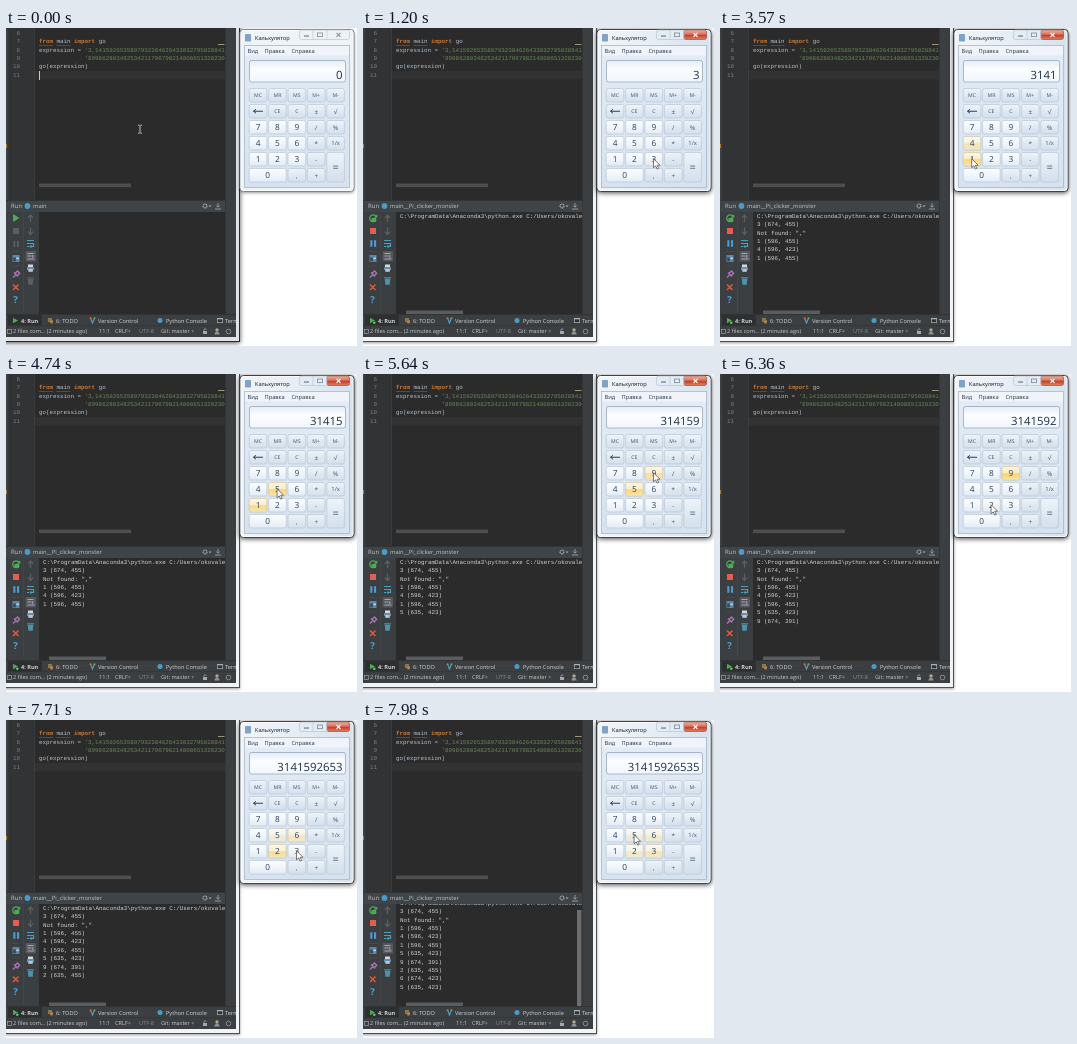
Write an HTML page that moves like this. It is 351x318 px and loops after 8 s.

```html
<!DOCTYPE html>
<html lang="en">
<head>
<meta charset="utf-8">
<title>Pi clicker</title>
<style>
html, body { margin: 0; width: 100%; height: 100%; overflow: hidden; background: #fff; }
svg { display: block; width: 351px; height: 318px; }
text { white-space: pre; text-rendering: geometricPrecision; }
.mono { font-family: "Liberation Mono", "DejaVu Sans Mono", monospace; font-size: 5.85px; }
.ui { font-family: "Open Sans", "Noto Sans", sans-serif; }
.shade { filter: drop-shadow(0 1px 2.5px rgba(0, 0, 0, .7)); }
.soft { filter: drop-shadow(0 1px 1.5px rgba(0, 0, 0, .4)); }
</style>
</head>
<body>
<svg id="stage" viewBox="0 0 351 318">
  <defs>
    <linearGradient id="key" x2="0" y2="1">
      <stop offset="0" stop-color="#fbfdff"/><stop offset=".5" stop-color="#f1f6fb"/><stop offset="1" stop-color="#e1eaf4"/>
    </linearGradient>
    <linearGradient id="func" x2="0" y2="1">
      <stop offset="0" stop-color="#edf3f9"/><stop offset="1" stop-color="#d3dfec"/>
    </linearGradient>
    <linearGradient id="hot" x2="0" y2="1">
      <stop offset="0" stop-color="#fdf6e3"/><stop offset=".46" stop-color="#fdebbd"/>
      <stop offset=".54" stop-color="#fad270"/><stop offset="1" stop-color="#fbe7a2"/>
    </linearGradient>
    <linearGradient id="screen" x2="0" y2="1">
      <stop offset="0" stop-color="#e4ecf6"/><stop offset=".4" stop-color="#fbfdff"/><stop offset="1" stop-color="#f1f6fc"/>
    </linearGradient>
    <linearGradient id="body" x2="0" y2="1">
      <stop offset="0" stop-color="#e3ecf6"/><stop offset="1" stop-color="#d6e2ef"/>
    </linearGradient>
    <linearGradient id="glass" x2="1" y2="0">
      <stop offset="0" stop-color="#f1f5f9"/><stop offset=".5" stop-color="#e6edf5"/><stop offset="1" stop-color="#d6e2ee"/>
    </linearGradient>
    <linearGradient id="red" x2="0" y2="1">
      <stop offset="0" stop-color="#e9b5a8"/><stop offset=".45" stop-color="#d8715e"/>
      <stop offset=".55" stop-color="#c5402a"/><stop offset="1" stop-color="#dd8260"/>
    </linearGradient>
    <clipPath id="editClip"><rect x="0" y="0" width="219" height="172"/></clipPath>
    <clipPath id="logClip"><rect x="33" y="184" width="186" height="102"/></clipPath>
    <clipPath id="ideClip"><rect x="0" y="0" width="230" height="309"/></clipPath>
  </defs>
</svg>
<script>
const LOOP = 8000, START = 90, FOCUS = 1110, SCROLL = 7890;
const stage = document.getElementById('stage');

function el(parent, tag, attrs, content) {
  const node = document.createElementNS('http://www.w3.org/2000/svg', tag);
  for (const k in attrs) node.setAttribute(k, attrs[k]);
  if (content !== undefined) node.textContent = content;
  parent.appendChild(node);
  return node;
}
const group = (p, attrs) => el(p, 'g', attrs || {});
const box = (p, x, y, width, height, fill, more) => el(p, 'rect', { x, y, width, height, fill, ...more });
const path = (p, d, stroke, more) => el(p, 'path', { d, stroke, fill: 'none', ...more });
const shape = (p, d, fill) => el(p, 'path', { d, fill });
const dot = (p, cx, cy, r, fill) => el(p, 'circle', { cx, cy, r, fill });
const mono = (p, x, y, s, fill, more) => el(p, 'text', { x, y, fill, class: 'mono', ...more }, s);
const label = (p, x, y, s, size, fill, more) =>
  el(p, 'text', { x, y, fill, class: 'ui', 'font-size': size, ...more }, s);
const show = (node, on) => node.setAttribute('visibility', on ? 'visible' : 'hidden');

// ---- IDE window ----
const frameOn = group(stage), frameOff = group(stage);
box(frameOn, -10, -10, 243.5, 323.5, '#dfe3e8', { stroke: '#26292c', class: 'shade' });
box(frameOff, -10, -10, 243.5, 323.5, '#f1f3f5', { stroke: '#4b4f52', class: 'soft' });

const ide = group(stage, { 'clip-path': 'url(#ideClip)' });
box(ide, 0, 0, 230, 309, '#3c3f41');
box(ide, 3, 0, 216, 172, '#2b2b2b');
box(ide, 3, 0, 25, 172, '#313335');
box(ide, 28, 43, 191, 8.5, '#323232');
box(ide, 28.5, 0, .5, 172, '#484b4d');
box(ide, 2.5, 0, .6, 286, '#2c2e2f');
box(ide, 219, 0, .6, 286, '#2c2e2f');
box(ide, 0, 116, 1, 4, '#b5722f');

const code = group(ide, { 'clip-path': 'url(#editClip)' });
const lineY = i => 7 + i * 8.3;
for (let i = 0; i < 6; i++)
  mono(code, 14, lineY(i), 6 + i, '#7d8285', { 'text-anchor': 'end' });
function codeLine(i, parts) {
  const t = mono(code, 33, lineY(i), '', '#a9b7c6');
  for (const [s, fill, weight] of parts) el(t, 'tspan', { fill, 'font-weight': weight || 400 }, s);
}
const plain = '#b4c1cf', word = '#cc7832', str = '#6a8759';
codeLine(1, [['from', word, 700], [' main ', plain], ['import', word, 700], [' go', plain]]);
codeLine(2, [['expression = ', plain], ["'3,14159265358979323846264338327950288419", str]]);
codeLine(3, [['             ', plain], ["'8998628034825342117067982148086513282306", str]]);
codeLine(4, [['go(expression)', plain]]);
path(code, 'M33 17.500h14M50.500 17.500h14', '#a8503a', { 'stroke-width': .6 });
box(code, 212, 16, 6.5, 1, '#9c9478');
box(code, 33, 155.5, 92, 3.6, '#4c4e50');
const caret = box(ide, 33, 43, 1, 9, '#c8c8c8');

// run panel
box(ide, 0, 172, 219, 12, '#3e4447');
box(ide, 0, 172, 219, .6, '#2a2c2d');
box(ide, 33, 184, 186, 102, '#2b2b2b');
box(ide, 0, 184, 33, 102, '#3c3f41');
box(ide, 17, 186, .5, 98, '#4b4e50');
label(ide, 5, 180.2, 'Run', 6, '#c3c6c8');
dot(ide, 21.5, 178, 2.9, '#4d9ac4');
const title = label(ide, 27, 180.2, 'main', 5.8, '#c3c6c8');
el(ide, 'circle', { cx: 199, cy: 178, r: 1.9, fill: 'none', stroke: '#a9adb0', 'stroke-width': 1.3, 'stroke-dasharray': '1 .5' });
shape(ide, 'M202.500 177.500h3l-1.500 1.800z', '#a9adb0');
path(ide, 'M212 175v4M210.300 177.500l1.700 1.800 1.700-1.800M209 181h6', '#a9adb0', { 'stroke-width': .8 });

const idle = group(ide), busy = group(ide);
shape(idle, 'M7 186l6.500 4-6.500 4z', '#4faa55');
box(idle, 7, 200, 6, 6, '#5b5e60');
shape(idle, 'M7.500 213h1.800v6h-1.800zM11 213h1.800v6h-1.800z', '#5d6062');
path(busy, 'M13 188.500a3.400 3.400 0 1 0 .3 3', '#4faa55', { 'stroke-width': 1.3 });
shape(busy, 'M14.300 186.200v3.600h-3.600z', '#4faa55');
box(busy, 8.500, 190, 4.500, 4, '#4faa55');
box(busy, 7, 200, 6, 6, '#e05f52');
shape(busy, 'M7.300 212.300h2.100v6.400h-2.100zM11 212.300h2.100v6.400h-2.100z', '#4a9dd0');

box(ide, 6.500, 227, 7, 7, '#5a87a8');
box(ide, 7.200, 229.500, 2.600, 3.800, '#33495a');
box(ide, 10.400, 229.500, 2.500, 1.600, '#c5d5e0');
path(ide, 'M6 238h8M6 223.500h8', '#515456', { 'stroke-width': .5 });
path(ide, 'M7 249.500l2.500-2.500M8 244.500l4 4M9.500 245l2-2 2.200 2.200-2 2', '#a878b4', { 'stroke-width': 1.3 });
path(ide, 'M7 256.500l5.500 5.500M12.500 256.500l-5.500 5.500', '#dd5b3c', { 'stroke-width': 1.5 });
label(ide, 7.300, 274.800, '?', 9.5, '#4ba4d8', { 'font-weight': 700 });

path(ide, 'M24.500 194v-7M22 189.800l2.500-2.800 2.500 2.800M24.500 199.500v7M22 203.700l2.500 2.800 2.500-2.800', '#5d6062', { 'stroke-width': 1.2 });
path(ide, 'M21 212.500h7M21 215.500h6.500v3h-3M21 218.500h2', '#4c9fb8', { 'stroke-width': 1.2 });
shape(ide, 'M25.500 216.700v3.600l-2.200-1.800z', '#4c9fb8');
box(ide, 19.500, 223, 10.500, 10.500, '#55595c', { rx: 1 });
path(ide, 'M21.500 225.500h6M21.500 228h4M21.500 231h7M26.800 227v3', '#b8a9c9', { 'stroke-width': .9 });
box(ide, 22, 236.500, 5, 2.500, '#d5d9dc');
box(ide, 21, 239, 7, 3, '#5e8fb8', { rx: .6 });
box(ide, 22.300, 241, 4.500, 2.800, '#c3c6c8');
const bin = shape(ide, 'M21.800 251h5.500l-.6 5.800h-4.300zM21.200 249.300h6.700v1.100h-6.700z', '#5c6062');

const logGroup = group(ide, { 'clip-path': 'url(#logClip)' });
const logText = group(logGroup);
const LOG = [
  [START, 'C:\\ProgramData\\Anaconda3\\python.exe C:/Users/okovale'],
  [1750, '3 (674, 455)'], [1750, 'Not found: ","'],
  [2850, '1 (596, 455)'], [3300, '4 (596, 423)'], [3570, '1 (596, 455)'],
  [4830, '5 (635, 423)'], [5730, '9 (674, 391)'], [6810, '2 (635, 455)'],
  [SCROLL, '6 (674, 423)'], [SCROLL, '5 (635, 423)']
].map(([at, s], i) => ({ at, node: mono(logText, 37, 190 + i * 8.37, s, '#d2d2d2') }));
const scrollX = box(ide, 43, 282.500, 57, 3.500, '#5a5d5f');
const scrollY = box(ide, 214, 190, 4.500, 96, '#6b6d6f');

// bottom bars
box(ide, 0, 286, 230, .6, '#2a2c2d');
box(ide, 2, 287, 34, 10.500, '#2d2f30');
box(ide, 0, 297.500, 230, .6, '#2f3132');
shape(ide, 'M7 289.700l5 2.800-5 2.800z', '#4faa55');
const runDot = dot(ide, 11.300, 294.700, 1.200, '#63d06a');
const bar = (x, s, more) => label(ide, x, 294.600, s, 5.6, '#d0d3d5', more);
bar(15, '4: Run', { 'font-weight': 700 });
path(ide, 'M42 291h4M42 293h5', '#d3b05c', { 'stroke-width': 1 });
dot(ide, 45.500, 294, 1.500, '#d0793b');
bar(50, '6: TODO');
path(ide, 'M84.500 290l2 5 2-5', '#5a9fc5', { 'stroke-width': 1.1 });
dot(ide, 84.500, 290.300, 1, '#cf6d4a');
dot(ide, 88.500, 290.300, 1, '#67ac62');
bar(92, 'Version Control');
dot(ide, 154, 292.500, 2.500, '#4d9ac4');
bar(160, 'Python Console');
box(ide, 211, 290, 6, 5, '#a9b1b6');
box(ide, 211.700, 291.300, 4.600, 3, '#303335');
bar(219, 'Terminal');
const status = (x, s, fill) => label(ide, x, 305.400, s, 5.6, fill || '#c6c9cb');
box(ide, 1.500, 301.500, 4, 4, 'none', { stroke: '#9da1a4', 'stroke-width': .7 });
status(7, '2 files com... (2 minutes ago)');
status(93, '11:1');
status(109, 'CRLF÷');
status(133, 'UTF-8', '#86898b');
status(155, 'Git: master ÷');
box(ide, 197, 303, 4, 3, '#a4a8ab');
path(ide, 'M198 303v-1.200a1.100 1.100 0 0 1 2.200 0', '#a4a8ab', { 'stroke-width': .7 });
dot(ide, 211, 302, 1.700, '#b5a58a');
shape(ide, 'M208.500 306.500a2.500 2.800 0 0 1 5 0z', '#8f9497');
el(ide, 'circle', { cx: 222.500, cy: 303.500, r: 2.300, fill: 'none', stroke: '#999da0', 'stroke-width': .8 });

// ---- calculator ----
function calcFrame(fill, edge, cls, glyph, active) {
  const g = group(stage);
  box(g, 234, 1.500, 114, 162, fill, { rx: 3.500, stroke: edge, class: cls });
  box(g, 235, 2.500, 112, 160, 'none', { rx: 2.800, stroke: '#fff', 'stroke-opacity': .8, 'stroke-width': .9 });
  box(g, 293.500, 2, 50, 9.500, active ? '#e3ebf3' : '#edf2f7', { rx: 2, stroke: '#b5c0cb', 'stroke-width': .6 });
  if (active) box(g, 321, 2, 22.500, 9.500, 'url(#red)', { rx: 2, stroke: '#94483c', 'stroke-width': .6 });
  path(g, 'M307 2v9.500M321 2v9.500', '#b9c4cf', { 'stroke-width': .6 });
  box(g, 298, 7.300, 5, 1.500, glyph);
  box(g, 311.500, 5, 5, 3.600, 'none', { stroke: glyph, 'stroke-width': .9 });
  path(g, 'M330.500 4.800l4 4M334.500 4.800l-4 4', active ? '#fff' : glyph, { 'stroke-width': 1.2 });
  return g;
}
const calcOff = calcFrame('#eef3f8', '#7d858e', 'soft', '#8b949e', false);
const calcOn = calcFrame('url(#glass)', '#3b444c', 'shade', '#8593a1', true);

const calc = group(stage);
box(calc, 239, 6, 6, 7.500, '#7fa3c6', { rx: .8 });
label(calc, 249, 12, 'Калькулятор', 5.65, '#15191d');
box(calc, 238.500, 17.500, 105, 142, 'url(#body)', { stroke: '#a3b1c1', 'stroke-width': .7 });
box(calc, 239, 18, 104, 9.500, '#f0f4fa');
const menu = (x, s) => label(calc, x, 24.600, s, 5.7, '#26364a');
menu(241.500, 'Вид');
menu(258.500, 'Правка');
menu(285.500, 'Справка');
box(calc, 243.500, 32.500, 96, 21.500, 'url(#screen)', { rx: 2, stroke: '#98a8ba', 'stroke-width': .8 });
const digits = label(calc, 336.500, 51.200, '0', 11.4, '#1e2f47', { 'text-anchor': 'end' });

const keys = {};
const colX = i => 243.200 + i * 19.400, rowY = i => 60.500 + i * 16;
function key(name, c, r, w, h) {
  const x = colX(c), y = rowY(r), isDigit = /^\d$/.test(name);
  const edge = { rx: 1.800, 'stroke-width': .6 };
  const cx = x + w / 2, cy = y + h / 2;
  box(calc, x, y, w, h, isDigit ? 'url(#key)' : 'url(#func)', { ...edge, stroke: '#b3c2d2' });
  const glow = box(calc, x, y, w, h, 'url(#hot)', { ...edge, stroke: '#e3c88c', opacity: 0 });
  if (name === '←') {
    path(calc, `M${cx + 5} ${cy}h-9.500m2.500-2l-2.500 2 2.500 2`, '#28405f', { 'stroke-width': 1 });
  } else {
    const size = isDigit ? 8.3 : name === '=' ? 11 : name === '1/x' ? 5.8 : /^[A-Z]/.test(name) ? 5.2 : 6.3;
    label(calc, cx, cy + size * .36, name, size, isDigit ? '#28405f' : '#3d5470', { 'text-anchor': 'middle' });
  }
  keys[name] = { glow, x: cx, y: cy };
}
['MC MR MS M+ M-', '← CE C ± √', '7 8 9 / %', '4 5 6 * 1/x', '1 2 3 -']
  .forEach((row, r) => row.split(' ').forEach((s, c) => key(s, c, r, 17.600, 13.500)));
key('=', 4, 4, 17.600, 29.500);
key('0', 0, 5, 37, 13.500);
key(',', 2, 5, 17.600, 13.500);
key('+', 3, 5, 17.600, 13.500);

// ---- pointers ----
const beam = path(stage, 'M132 97.200h1.500M134.500 97.200h1.500M134 97.500v7.500M132 105.200h1.500M134.500 105.200h1.500', '#d5d5d5', { 'stroke-width': .9 });
const arrow = el(stage, 'path', {
  d: 'M0 0v9l2.100-1.900 1.500 3.300 1.500-.7-1.500-3.200h2.900z', fill: '#fff', stroke: '#444', 'stroke-width': .7
});

const CLICKS = [
  [1110, 3], [2310, 1], [2760, 4], [3120, 1], [4290, 5], [5280, 9],
  [6270, 2], [7170, 6], [7440, 5], [7620, 3], [7890, 5]
];
const FADE_IN = 450, FADE_OUT = 1000, LAG = 60;
const clamp = v => Math.max(0, Math.min(1, v));

// Each visit warms a key up; after leaving, it cools from the level it reached.
function glowAt(name, t) {
  return CLICKS.reduce((best, [at, k], i) => {
    if (at > t || String(k) !== name) return best;
    const leave = i + 1 < CLICKS.length ? CLICKS[i + 1][0] : LOOP;
    const reached = clamp((Math.min(t, leave) - at - LAG) / FADE_IN);
    const gone = clamp((t - leave) / FADE_OUT);
    return Math.max(best, reached * (1 - gone * gone));
  }, 0);
}

function draw(t) {
  const running = t >= START, focused = t >= FOCUS;
  show(idle, !running);
  for (const node of [busy, runDot, scrollX]) show(node, running);
  bin.setAttribute('fill', running ? '#4c93ad' : '#5c6062');
  title.textContent = running ? 'main__Pi_clicker_monster' : 'main';
  show(caret, t < 550);
  for (const node of [beam, frameOn, calcOff]) show(node, !focused);
  for (const node of [arrow, frameOff, calcOn]) show(node, focused);

  for (const line of LOG) show(line.node, t >= line.at);
  show(scrollY, t >= SCROLL);
  logText.setAttribute('transform', `translate(0 ${t >= SCROLL ? -5 : 0})`);

  const done = CLICKS.filter(c => c[0] <= t).map(c => c[1]);
  digits.textContent = done.join('') || '0';
  if (done.length) {
    const k = keys[done[done.length - 1]];
    arrow.setAttribute('transform', `translate(${k.x - .3} ${k.y - .5})`);
  }
  for (const name in keys) keys[name].glow.setAttribute('opacity', glowAt(name, t));
}

const begin = performance.now();
function tick() {
  draw((performance.now() - begin) % LOOP);
  requestAnimationFrame(tick);
}
draw(0);
requestAnimationFrame(tick);
</script>
</body>
</html>
```
